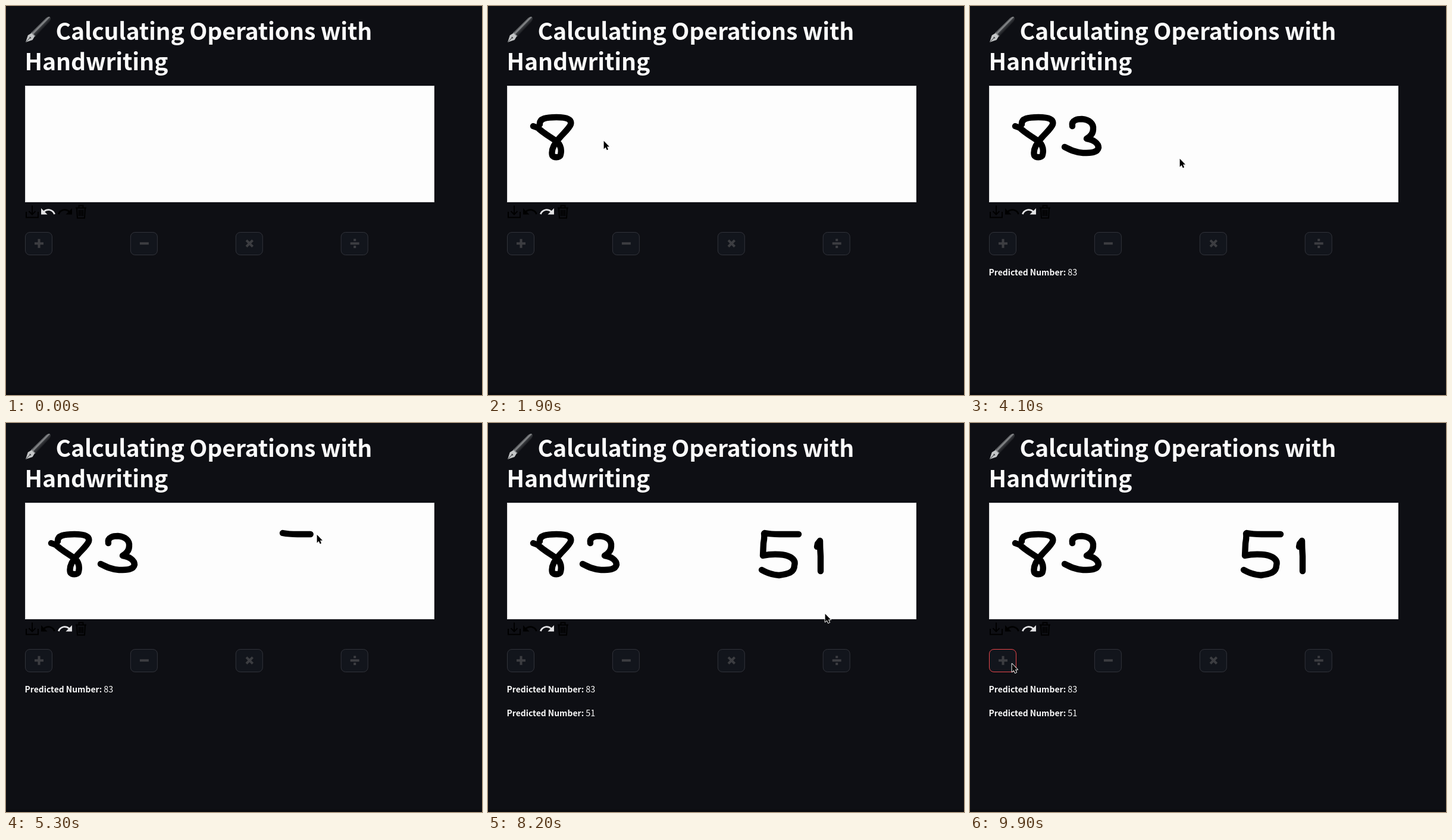
Write an HTML page that moves like this. It is 800x654 px and loops after 10000 ms.

```html
<!DOCTYPE html>
<html lang="en">
<head>
<meta charset="utf-8">
<title>Calculating Operations with Handwriting</title>
<style>
  html, body { margin: 0; width: 100%; height: 100%; overflow: hidden; background: #0e0f14; }
  svg { display: block; width: 800px; height: 654px; }
  text { font-family: "Noto Sans CJK JP", "Noto Sans CJK SC", "Noto Sans CJK", "Open Sans", sans-serif; fill: #fafafa; }
  .title { font-size: 39.2px; font-weight: 700; letter-spacing: -.22px; }
  .result { font-size: 14.4px; }
  .result .label { font-size: 13.9px; font-weight: 700; }
  .ink { fill: none; stroke: #000; stroke-width: 10.4; stroke-linecap: round; stroke-linejoin: round; }
  .icon { fill: none; stroke: #000; stroke-width: 2; }
  .button rect { fill: #12151c; stroke: #31333a; }
  .button path { fill: none; stroke: #3c3d41; stroke-width: 4; }
</style>
</head>
<body>
<svg viewBox="0 0 800 654">
  <defs>
    <linearGradient id="barrel" x2="0" y2="1">
      <stop offset="0" stop-color="#3a3c40"/>
      <stop offset=".35" stop-color="#8e9092"/>
      <stop offset=".55" stop-color="#36383c"/>
      <stop offset="1" stop-color="#17181c"/>
    </linearGradient>
    <path id="turn" d="M12.5 8c-2.65 0-5.05.99-6.9 2.6L2 7v9h9l-3.62-3.62c1.39-1.16 3.16-1.88 5.12-1.88 3.54 0 6.55 2.31 7.6 5.5l2.37-.78C21.08 11.03 17.15 8 12.5 8z"/>
  </defs>
  <rect width="800" height="654" fill="#0e0f14"/>
  <rect y="650" width="800" height="4" fill="#0a0b0f"/>

  <g transform="translate(33 61) rotate(-45.5)">
    <path d="M18 -5L53 -4.2Q59 -3 59 0Q59 3 53 4.2L18 5Z" fill="url(#barrel)"/>
    <path d="M0 0L11 -5.5L18 -3.8V3.8L11 5.5Z" fill="#c4c6c7"/>
    <path d="M0 0H11" stroke="#4b4d50"/>
    <circle cx="11" r="1.4" fill="#4b4d50"/>
    <path d="M18.500 -4.500V4.500" stroke="#8c8e90" stroke-width="1.200"/>
  </g>
  <text class="title" x="83.6" y="56.5">Calculating Operations with</text>
  <text class="title" x="31.6" y="108">Handwriting</text>

  <rect x="32" y="134" width="688" height="196" fill="#fdfdfd"/>
  <rect x="32.5" y="134.5" width="687" height="195" fill="none" stroke="#dfdfe0"/>

  <path class="icon" d="M34 346V355.500H54V346M44 335.500V350M38.500 345L44 350.500L49.500 345"/>
  <use id="undo" href="#turn" transform="translate(56.700 331.800) scale(1.17)"/>
  <use id="redo" href="#turn" transform="translate(113.300 331.800) scale(-1.17 1.17)"/>
  <path class="icon" d="M117 339.500H135M122.500 339V335.500H129.500V339M119 340L120 356.500H132L133 340M123 343V353M126 343V353M129 343V353"/>

  <g id="buttons"></g>
  <g id="ink"></g>
  <g id="results"></g>
  <path id="cursor" d="M.6 .8V14.400L3.700 11.500L5.800 16.200L8 15.200L6 10.600H10Z"
        fill="#000" stroke="#fff" stroke-width="1.900" stroke-linejoin="round" paint-order="stroke"/>
</svg>
<script>
const LOOP = 10000, STEP = 100, LEAD = 11;
const $ = id => document.getElementById(id);

function add(parent, tag, attrs, text = '') {
  const el = document.createElementNS('http://www.w3.org/2000/svg', tag);
  for (const key in attrs) el.setAttribute(key, attrs[key]);
  el.textContent = text;
  return parent.appendChild(el);
}

// Operator buttons
const signs = [
  'M-7.500 0H7.500M0 -7.500V7.500',
  'M-7.500 0H7.500',
  'M-5.300 -5.300L5.300 5.300M-5.300 5.300L5.300 -5.300',
  'M-7.500 0H7.500M0 -7.700V-3.900M0 3.900V7.700'
];
const buttons = signs.map((d, i) => {
  const g = add($('buttons'), 'g', { class: 'button', transform: `translate(${32.5 + i * 176.9} 380.5)` });
  const box = add(g, 'rect', { width: 45, height: 38, rx: 7.5 });
  add(g, 'path', { d, transform: 'translate(23 18.700)' });
  return box;
});

// Pen strokes: start, end, path
const strokes = [
  [900, 1480, 'M87 199C86 189 98 187 115 187C134 187 141 191 139 199C137 205 128 213 120 222C110 233 106 243 108 251C109 255 121 256 122 250C124 242 123 235 116 228C106 221 92 213 84 205L76 202'],
  [2300, 3600, 'M172 202C170 191 182 190 188 190C201 191 208 198 207 207C207 214 203 219 196 223C208 225 216 231 216 238C214 247 203 247 190 247C177 246 169 242 159 237'],
  [5200, 5322, 'M465 185Q475 187 490 187H522'],
  [5600, 6350, 'M464 186Q465 192 463 202L462 223Q475 220 490 221C507 222 518 229 515 239C515 252 503 254 489 256C475 255 467 251 460 247'],
  [6950, 7350, 'M553 208L554 203L558 198Q558 210 559 224V249']
].map(([start, end, d]) => {
  const el = add($('ink'), 'path', { class: 'ink', d });
  return { start, end, el, len: el.getTotalLength() };
});

// Pointer stops between strokes: time, x, y
const stops = [
  [100, 430, 205], [1650, 279, 222], [1900, 194, 226], [2150, 172, 202],
  [4100, 352, 256], [4400, 483, 197], [5100, 465, 185],
  [6700, 565, 215], [7900, 569, 320], [8100, 569, 320], [8200, 566, 320],
  [8500, 450, 392], [8800, 235, 446], [9100, 75, 425], [9200, 66, 412],
  [9300, 66, 412], [9600, 72, 404], [9900, 70, 404]
];
for (const { start, end, el, len } of strokes) {
  const a = el.getPointAtLength(0), b = el.getPointAtLength(len);
  stops.push([start, a.x, a.y], [end, b.x, b.y]);
}
stops.sort((a, b) => a[0] - b[0]);

// Recognised values: time, text
const results = [
  { y: 453, steps: [[2100, '8'], [3900, '83']] },
  { y: 493, steps: [[6000, '5'], [7700, '51']] }
].map(({ y, steps }) => {
  const el = add($('results'), 'text', { class: 'result', x: 31.5, y });
  add(el, 'tspan', { class: 'label' }, 'Predicted Number:');
  return { el, steps, value: add(el, 'tspan', { dx: 3 }) };
});

const show = (el, on) => { el.style.visibility = on ? 'visible' : 'hidden'; };

function pointer(t) {
  const s = strokes.find(s => t > s.start && t < s.end);
  if (s) {
    const p = (t - s.start) / (s.end - s.start);
    const { x, y } = s.el.getPointAtLength(Math.min(s.len, p * s.len + LEAD));
    return [x, y];
  }
  const i = stops.findIndex(k => k[0] > t);
  if (i < 0) return stops[stops.length - 1].slice(1);
  const [t0, x0, y0] = stops[Math.max(0, i - 1)], [t1, x1, y1] = stops[i];
  const k = t1 > t0 ? (t - t0) / (t1 - t0) : 0;
  return [x0 + (x1 - x0) * k, y0 + (y1 - y0) * k];
}

function draw(t) {
  for (const { start, end, el, len } of strokes) {
    const p = Math.min(1, Math.max(0, (t - start) / (end - start)));
    show(el, p > 0);
    el.style.strokeDasharray = p < 1 ? `${p * len} ${len + 20}` : 'none';
  }
  for (const { el, steps, value } of results) {
    const now = steps.filter(s => t >= s[0]).pop();
    show(el, now);
    value.textContent = now ? now[1] : '';
  }
  const drawn = t >= 1700;
  $('undo').style.fill = drawn ? '#000' : '#e4e4e6';
  $('redo').style.fill = drawn ? '#e4e4e6' : '#000';
  buttons[0].style.stroke = t >= 9100 ? '#e8454a' : '';
  show($('cursor'), t >= 100);
  $('cursor').setAttribute('transform', `translate(${pointer(t)})`);
}

const begin = performance.now();
function tick() {
  const t = (performance.now() - begin) % LOOP;
  draw(Math.floor(t / STEP) * STEP);
  requestAnimationFrame(tick);
}
tick();
</script>
</body>
</html>
```
